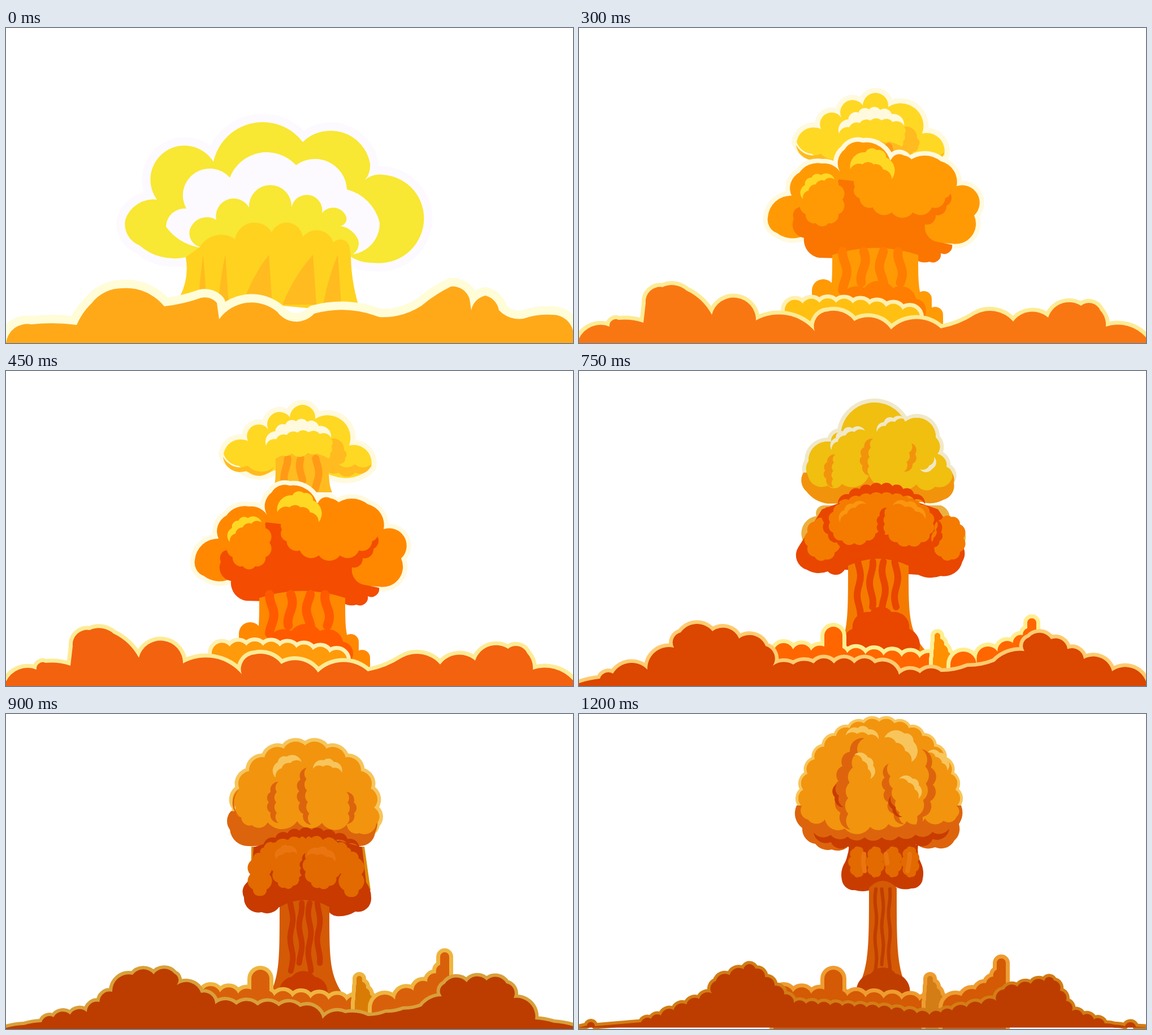
An HTML page that plays this animation: 1003x558 px, repeating every 1350 ms.

```html
<!DOCTYPE html>
<html lang="en">
<head>
<meta charset="utf-8">
<title>Explosion</title>
<style>
html, body { margin: 0; width: 100%; height: 100%; overflow: hidden; background: #fff; }
svg { display: block; width: 100vw; height: 100vh; }
path { paint-order: stroke; stroke-linejoin: round; stroke-linecap: round; }
.pose { visibility: hidden; animation: show 1350ms step-end infinite; }
@keyframes show {
  0% { visibility: visible; }
  11.1111%, 100% { visibility: hidden; }
}
</style>
</head>
<body>
<svg id="stage" viewBox="0 0 1003 558" preserveAspectRatio="none"></svg>
<script>
const range = (n, make) => Array.from({ length: n }, (_, i) => make(i));
const mix = (a, b, t) => a + (b - a) * t;
const path = (d, fill, rim = 'none', width = 0) =>
  `<path d="${d}" fill="${fill}" stroke="${rim}" stroke-width="${width}"/>`;

// Arcs from point to point; long sides are split into puffs of about the given size.
// The optional third value of a point is arc height / chord, negative for a dent.
function outline(points, size, closed = true) {
  let d = `M${points[0][0]} ${points[0][1]}`;
  for (let i = 0; i < points.length - (closed ? 0 : 1); i++) {
    const [x, y, bulge = .25] = points[i];
    const [nx, ny] = points[(i + 1) % points.length];
    const length = Math.hypot(nx - x, ny - y);
    const steps = size ? Math.max(1, Math.round(length / size)) : 1;
    const k = Math.abs(bulge);
    const r = k ? length / steps * (4 * k * k + 1) / (8 * k) : 0;
    for (let s = 1; s <= steps; s++)
      d += `A${r} ${r} 0 ${+(k > .5)} ${+(bulge > 0)} ${mix(x, nx, s / steps)} ${mix(y, ny, s / steps)}`;
  }
  return d;
}

const puffs = (fill, points, size, rim, width) => path(outline(points, size) + 'Z', fill, rim, width);

function ground(fill, points, size, rim, width, floor = 558) {
  const top = outline(points, size, false);
  return path(top, 'none', rim, width) + path(`${top}V${floor}H0Z`, fill);
}

const ring = (cx, cy, rx, ry, n, from = 0, sweep = 2 * Math.PI) => range(n, i => {
  const a = from + sweep * i / (sweep > 6 ? n : n - 1);
  return [cx + rx * Math.cos(a), cy + ry * Math.sin(a)];
});
const dome = (cx, cy, rx, ry, n) => ring(cx, cy, rx, ry, n, Math.PI, Math.PI);
const oval = (fill, cx, cy, rx, ry, n) => puffs(fill, ring(cx, cy, rx, ry, n));

// Scalloped crescent on the left-hand side of the way from one end to the other.
function strip(fill, x1, y1, x2, y2, width, n, bend = 0) {
  const length = Math.hypot(x2 - x1, y2 - y1);
  const at = (t, w, bulge) => {
    const off = (bend * 4 * t * (1 - t) + w * Math.sqrt(Math.sin(Math.PI * t))) / length;
    return [mix(x1, x2, t) + (y2 - y1) * off, mix(y1, y2, t) - (x2 - x1) * off, bulge];
  };
  const outer = range(n, i => at(i / n, width, .25));
  const inner = range(n, i => at(1 - i / n, 0, -.2));
  return puffs(fill, [...outer, ...inner]);
}

const stem = (fill, left, right, top, footLeft, footRight, bottom) => {
  const low = mix(top, bottom, .75), high = mix(top, bottom, .6);
  return path(`M${left} ${top}C${left} ${high} ${left} ${low} ${footLeft} ${bottom}H${footRight}` +
    `C${right} ${low} ${right} ${high} ${right} ${top}Q${(left + right) / 2} ${top - 25} ${left} ${top}Z`, fill);
};

const streaks = (color, x1, x2, top, bottom, n, width) => range(n, i => {
  const x = mix(x1, x2, i / (n - 1)), end = bottom - 14 * (i % 2);
  const points = range(13, j => {
    const y = mix(top, end, j / 12);
    return `${x + width / 4 * Math.sin(y / 11 + i * 2)} ${y}`;
  });
  return path('M' + points.join('L'), 'none', color, width);
}).join('');

const spikes = (fill, tip, foot, list) => list.map(([x, lean]) =>
  path(`M${x} ${tip}L${x + 6} ${foot}H${x - lean}Q${x - lean * .6} ${mix(tip, foot, .4)} ${x} ${tip}`, fill)).join('');

// Round-topped columns merged into one silhouette.
function skyline(fill, rim, columns) {
  const shapes = columns.map(([x, y, r]) => `M${x - r} 570V${y}A${r} ${r} 0 0 1 ${x + r} ${y}V570Z`);
  const d = shapes.join('');
  return path(d, rim, rim, 14) + path(d, fill);
}

function mounds(poleX, tipX, tipY, footX, main, rim, accent) {
  const row = range(9, i => [362 + 32 * i, 500 + 2.2 * i, 18]);
  const pole = range(4, i => [poleX + 3 * i, 469 + 14 * i, 5 + 4 * i]);
  const heap = range(6, i => [mix(tipX, footX, (i / 5) ** 2), mix(tipY, 520, (i / 5) ** .8), 8 + 3 * i]);
  return skyline(main, rim, [...row, [450, 469, 16]]) + skyline(accent, rim, pole) + skyline(main, rim, heap);
}

const move = (markup, transform) => `<g transform="${transform}">${markup}</g>`;
const recolor = (markup, colors) => markup.replace(/#\w{6}/g, c => colors[c] || c);

function flash() {
  return [
    puffs('#f8e733', [[318, 406, .12], [236, 385, .18], [211, 340, .18], [267, 304, .52], [367, 237, .32], [525, 202, .3],
      [644, 240, .1], [635, 269, .1], [668, 260, .21], [739, 345, .21], [650, 416, .08], [608, 404, 0]], 0, '#fdfaff', 30),
    puffs('#fdfaff', [[343, 389, .1], [283, 352, .22], [319, 320, .45], [396, 265, .28], [513, 243, .3], [603, 286, .14],
      [661, 345, .2], [610, 401, 0]]),
    puffs('#f8e733', [[343, 388, .2], [325, 358], [372, 340, .43], [430, 318, .53], [505, 318, .5], [559, 328, .3],
      [602, 335, .3], [584, 350, .15], [623, 375, .2], [609, 403, 0]]),
    puffs('#ffd21f', [[318, 406, 0], [343, 388, .22], [405, 374, .35], [470, 362, .38], [525, 370, .3], [579, 380, .35],
      [608, 392, 0], [610, 404, -.04], [628, 505, 0], [308, 475, -.08]]),
    spikes('#ffbb1f', 402, 490, [[349, 9], [388, 13], [465, 47], [543, 54], [587, 26]]),
    ground('#ffa919', [[0, 558, .22], [45, 525, .03], [125, 526, .05], [152, 487, .12], [208, 461, .12], [280, 493, -.03],
      [345, 478, .14], [373, 487, 0], [377, 516, .22], [480, 503, -.24], [545, 506, .08], [660, 512, -.08], [735, 492, .03],
      [787, 458, .18], [820, 480, 0], [823, 500, .15], [848, 474, .15], [872, 500, -.12], [915, 515, .05], [965, 508, .25],
      [1003, 553]], 0, '#fffcd8', 30)
  ].join('');
}

function fireball() {
  const cloud = [[395, 343, .05], [350, 347, .25], [344, 292, .22], [367, 234, .1], [355, 198, .1], [372, 165, .18], [408, 146, .22],
    [449, 174, .47], [539, 151, .12], [583, 133, .24], [639, 185, .1], [631, 215, .12], [660, 209, .24], [709, 255, .16],
    [682, 292, .2], [645, 346, 0]];
  return [
    puffs('#f8e733', cloud, 0, '#fdfaff', 24),
    puffs('#ffa305', [[345, 347, 0], [672, 336], [722, 380], [640, 432, .05], [410, 422, .06], [365, 429], [319, 385]]),
    puffs('#f8e733', cloud),
    strip('#ffc71c', 408, 332, 403, 219, 22, 5, 20),
    strip('#ffc71c', 633, 267, 604, 341, 18, 4, 6),
    strip('#fdfaff', 410, 243, 620, 252, 24, 6, 62),
    strip('#fdfaff', 430, 295, 476, 265, 18, 4, 20),
    strip('#fdfaff', 512, 237, 590, 290, 20, 4, 14),
    puffs('#ffa305', [[385, 355], [438, 323], [606, 323], [635, 352], [606, 395], [395, 395]], 40),
    strip('#ffdd00', 460, 380, 385, 350, 24, 5, 28),
    strip('#ffdd00', 637, 352, 577, 404, 18, 4, 8),
    puffs('#ffb224', [[440, 330], [550, 322], [540, 340], [450, 343]], 35),
    puffs('#ffb224', [[552, 330], [575, 310], [603, 318], [600, 333, 0]], 25),
    stem('#ffc20a', 407, 612, 408, 388, 627, 490),
    spikes('#ffa305', 390, 478, [[432, 14], [500, 38], [556, 44], [592, 20]]),
    ground('#ffe61a', [[370, 505, .15], [440, 478, .15], [472, 465, .14], [497, 475, -.24], [533, 478, .14], [570, 457, .16],
      [600, 472, .03], [617, 500]], 0, '#fdfaff', 16),
    puffs('#ffe61a', [[617, 502, .18], [640, 486, .18], [673, 507, 0], [640, 530, 0]]),
    ground('#ff8c14', [[0, 545, .3], [27, 530, .05], [92, 523, .25], [151, 515], [160, 487, .15], [197, 501, .18], [275, 494, .6],
      [300, 499, .18], [382, 520, .18], [466, 541], [534, 529, .18], [638, 525, .08], [793, 499, .15], [815, 522, .2],
      [877, 512, .28], [918, 515, .12], [930, 536, .2], [1003, 550]], 0, '#fffcd8', 20)
  ].join('');
}

function crown() {
  return [
    puffs('#ffd824', [[474, 176, .18], [412, 168, .15], [385, 147], [428, 124, .5], [466, 107, .5], [502, 82, .52], [547, 85, .36],
      [607, 132, .28], [646, 170, .15], [580, 186, .08], [568, 180, 0]], 0, '#fff9de', 18),
    strip('#ffbb1f', 474, 170, 384, 152, 9, 2, 7),
    strip('#ffbb1f', 646, 165, 560, 165, 16, 3, 0),
    strip('#ffbb1f', 575, 120, 560, 168, 28, 4, 6),
    stem('#ffbb1f', 477, 571, 155, 471, 577, 215),
    streaks('#ff9a16', 495, 550, 155, 208, 3, 13),
    oval('#ffd824', 513, 132, 50, 14, 11),
    strip('#fff9de', 460, 132, 575, 118, 20, 6, 16)
  ].join('');
}

function belly() {
  return [
    puffs('#ff8800', [[398, 368, .14], [350, 363, .18], [334, 335, .2], [376, 297, .2], [390, 256, .15], [430, 240, .15],
      [463, 257, .2], [470, 215, .18], [502, 203, .2], [551, 238, .45], [582, 237, .18], [640, 236, .2], [668, 280, .4],
      [699, 332, .3], [660, 382, 0]], 0, '#fff9de', 16),
    puffs('#f44c00', [[380, 338], [391, 317, 0], [440, 300, 0], [460, 268, 0], [655, 290], [650, 315], [612, 348, -.18],
      [630, 378, 0], [660, 384, .3], [620, 414, .1], [596, 411, 0], [425, 407, .2], [398, 372]], 30),
    oval('#ff8800', 572, 281, 84, 47, 14),
    oval('#ff8800', 430, 304, 36, 44, 10),
    strip('#ffd824', 480, 250, 553, 268, 26, 4, 18),
    strip('#ffd824', 396, 303, 452, 268, 14, 4, 10),
    stem('#ff8800', 448, 600, 402, 407, 645, 520),
    skyline('#ff8800', 'none', [[432, 465, 20], [610, 480, 14], [630, 508, 14]]),
    puffs('#ff5a00', [...dome(530, 510, 82, 52, 6), [610, 540, 0], [450, 540, 0]]),
    streaks('#ff5a00', 470, 568, 396, 465, 4, 16)
  ].join('');
}

const bellyGround = () => skyline('#ff9a0a', '#fff0b0', range(8, i => [382 + 29 * i, 497 + .6 * (i - 2) ** 2, 18])) +
  ground('#f3620f', [[0, 550, .2], [54, 529, .3], [70, 517, .05], [114, 522, 0], [118, 487, .25], [148, 459, .15], [190, 465, .08],
    [235, 508, .45], [313, 518, .18], [417, 537, .25], [440, 502, .15], [487, 519, .2], [552, 534, .2], [640, 532, -.05],
    [700, 508, .18], [768, 520, .22], [830, 513, .25], [888, 492, .25], [922, 500, .1], [932, 529, .15], [1003, 548]], 0, '#fdeb95', 14);

function goldCap() {
  const cloud = [[405, 185, .15], [406, 160], [447, 126, .3], [463, 110, .38], [577, 90, .32], [631, 118, .2], [634, 147, .2],
    [650, 170, .2], [660, 190, .2], [630, 205], [597, 201], [513, 185], [465, 200], [440, 203]];
  return [
    puffs('#f0bf10', cloud, 0, '#f0e8c8', 14),
    puffs('#f2930c', [[397, 180, 0], [655, 175, .15], [663, 198, .2], [645, 228, .1], [605, 232, 0], [440, 235, .1], [402, 213, .18]]),
    puffs('#f0bf10', cloud, 60),
    strip('#f2930c', 450, 206, 453, 148, 14, 4, 2),
    strip('#f2930c', 514, 185, 520, 120, 14, 4, 3),
    strip('#f2930c', 588, 128, 575, 178, 12, 3),
    strip('#f0e8c8', 447, 140, 506, 106, 9, 4, 10),
    strip('#f0e8c8', 527, 108, 577, 86, 8, 3, 4),
    strip('#f0e8c8', 628, 152, 603, 174, 8, 2, 6)
  ].join('');
}

function goldBase() {
  return [
    puffs('#ecb040', [[396, 300], [420, 257], [432, 238, 0], [640, 238, .2], [655, 266], [683, 302, 0]]),
    puffs('#e94600', [[388, 312, 0], [430, 245, 0], [530, 208, 0], [635, 245, 0], [680, 312, .12], [678, 338, .2], [640, 363, .1],
      [600, 361, 0], [470, 352], [440, 355, .12], [403, 352]]),
    oval('#f47b00', 530, 250, 75, 34, 16),
    oval('#f47b00', 431, 298, 28, 36, 9),
    oval('#f47b00', 654, 296, 26, 38, 9),
    strip('#e94600', 485, 310, 440, 240, 16, 4, 10),
    oval('#f47b00', 487, 268, 43, 37, 12),
    strip('#e94600', 545, 300, 545, 242, 12, 4, 4),
    oval('#f47b00', 584, 270, 42, 38, 12),
    strip('#e94600', 630, 262, 600, 315, 12, 4, 14),
    strip('#e94600', 458, 236, 612, 236, 16, 8, 18),
    strip('#fb9510', 462, 268, 508, 236, 9, 3, 6),
    strip('#fb9510', 555, 238, 612, 262, 10, 3, 6),
    stem('#f47b00', 476, 583, 345, 454, 622, 505),
    puffs('#e94600', dome(534, 505, 62, 82, 6)),
    streaks('#e94600', 495, 561, 338, 432, 4, 12)
  ].join('');
}

const goldGround = () => ground('#db4600', [[0, 553, .03], [37, 545], [60, 536], [121, 529], [168, 490], [180, 463], [236, 461],
  [330, 487], [343, 522, .15], [415, 518], [523, 518], [566, 538, .2], [640, 533, -.05], [735, 515, .12], [788, 496],
  [796, 472], [835, 475], [893, 510], [943, 532], [1003, 550]], 42, '#ffcb70', 13);

function amberCap() {
  const cloud = [...dome(529, 166, 122, 110, 11), [655, 195], [625, 211], [603, 196], [515, 190], [463, 192], [435, 197], [416, 183]];
  return [
    puffs('#f2940e', cloud, 40, '#f6c55c', 13),
    puffs('#dc640c', [[398, 172, 0], [655, 180, .1], [653, 210, .2], [625, 234, .1], [585, 222, -.05], [470, 228, .05],
      [430, 234, .2], [396, 205, .18]]),
    puffs('#f2940e', cloud, 40),
    strip('#dc640c', 414, 183, 412, 134, 9, 1),
    strip('#dc640c', 482, 193, 482, 120, 13, 4, 4),
    strip('#dc640c', 540, 196, 532, 95, 14, 5, 3),
    strip('#dc640c', 602, 138, 603, 195, 12, 3, 2),
    strip('#f8c55c', 477, 113, 523, 85, 14, 3, 10),
    strip('#f8c55c', 543, 97, 594, 104, 12, 3, 7)
  ].join('');
}

function amberBase() {
  return [
    puffs('#dd8a00', [[433, 300, 0], [434, 235, 0], [634, 235, 0], [645, 312, 0]]),
    puffs('#c83a00', [[438, 236, 0], [530, 208, 0], [630, 236, 0], [637, 298, .08], [646, 325], [618, 350, .08], [585, 358, .15],
      [568, 345, 0], [483, 342, .18], [452, 351], [421, 325, .15], [423, 302, -.1], [435, 275, 0]]),
    oval('#e26a00', 530, 246, 80, 25, 16),
    oval('#e26a00', 449, 284, 17, 38, 8),
    oval('#e26a00', 611, 284, 18, 40, 8),
    oval('#e26a00', 497, 268, 25, 40, 11),
    strip('#c83a00', 537, 300, 535, 245, 10, 4, 4),
    oval('#e26a00', 559, 268, 30, 40, 11),
    strip('#c83a00', 455, 235, 625, 238, 14, 8, 17),
    strip('#ea7510', 478, 258, 515, 248, 14, 3, 6),
    strip('#ea7510', 532, 252, 582, 262, 14, 3, 6),
    stem('#d45a05', 484, 572, 342, 463, 602, 505),
    puffs('#c83a00', dome(526, 505, 40, 46, 4)),
    streaks('#c83a00', 505, 553, 335, 455, 4, 10)
  ].join('');
}

const amberGround = () => ground('#bd3d00', [[0, 556, .03], [63, 546], [84, 537], [143, 528], [188, 492], [224, 462], [298, 460],
  [302, 480], [345, 494], [370, 514, .2], [520, 519], [560, 540, .18], [600, 530, .08], [640, 535, -.05], [735, 518, .12],
  [771, 500], [776, 478], [815, 475], [850, 472], [885, 477], [898, 503], [936, 541, .03], [1003, 553]], 36, '#d8a03a', 12);

function copperCap() {
  const cloud = [...dome(531, 163, 137, 149, 17), [668, 182], [645, 189], [612, 185], [515, 200], [470, 203], [435, 187], [405, 187]];
  return [
    puffs('#f2940e', cloud, 34, '#f8c55c', 10),
    puffs('#dd640c', [[385, 162, 0], [676, 162, .12], [672, 195, .15], [664, 224, .2], [630, 236, .12], [600, 233, 0], [477, 234, .15],
      [447, 240, .15], [418, 230, .2], [395, 202, .18]]),
    strip('#c83c00', 655, 203, 415, 210, 20, 8, 12),
    puffs('#f2940e', cloud, 34),
    strip('#dd640c', 480, 205, 505, 43, 20, 6, 14),
    strip('#dd640c', 575, 195, 548, 88, 14, 5, 4),
    strip('#dd640c', 606, 62, 582, 208, 13, 5, 18),
    strip('#c83c00', 468, 165, 456, 124, 8, 2, 2),
    strip('#c83c00', 572, 182, 552, 145, 7, 2, 2),
    strip('#f8c55c', 540, 42, 588, 85, 24, 3, 8),
    strip('#f8c55c', 472, 38, 530, 45, 11, 3, 6),
    strip('#f8c55c', 487, 72, 515, 115, 12, 3, 7),
    strip('#f8c55c', 566, 115, 600, 150, 11, 3, 8),
    strip('#f8c55c', 617, 68, 651, 100, 11, 3, 4)
  ].join('');
}

function copperBase() {
  return [
    puffs('#c83c00', [[478, 232, 0], [600, 232, -.08], [605, 264, .08], [608, 292, .2], [588, 309, .1], [560, 306, 0], [518, 311, .08],
      [488, 312, .2], [465, 294, .1], [471, 262, -.04]]),
    range(4, i => oval('#e26a00', 493 + 31 * i, 262, 13, 27, 9)).join(''),
    streaks('#ea7510', 505, 583, 248, 278, 3, 8),
    stem('#d45a05', 513, 562, 308, 482, 590, 505),
    puffs('#c03d00', dome(538, 505, 44, 52, 4)),
    streaks('#c03d00', 525, 549, 310, 458, 3, 6)
  ].join('');
}

const copperGround = () => ground('#bd3d00', [[0, 555, 0], [14, 552, .5], [28, 553, 0], [110, 546], [145, 534], [235, 495], [242, 473],
  [291, 452, .4], [312, 451], [380, 512], [530, 521], [620, 533], [660, 525], [738, 508], [752, 488], [823, 473, .4],
  [840, 472], [872, 526], [930, 548, .05], [966, 553, .4], [985, 554, 0], [1003, 555]], 23, '#d27d15', 11, 555.5);

const brighter = { '#ff8800': '#ff9a05', '#f44c00': '#fa7600', '#ff5a00': '#ff7d00', '#f3620f': '#f97712', '#ff9a0a': '#ffc012' };
const warmer = { '#f0bf10': '#f8cc1a', '#f2930c': '#f9a718', '#f47b00': '#fa8200', '#e94600': '#ee4900', '#db4600': '#e75508' };
const bright = ['#ff6600', '#ffee90', '#ff9000'];
const dusky = ['#d9600a', '#eeb540', '#d97c05'];
const dim = ['#d45a05', '#ee9c30', '#d27d15'];

const poses = [
  flash(),
  fireball(),
  move(crown(), 'translate(0 55)') + recolor(belly() + bellyGround(), brighter),
  crown() + belly() + bellyGround(),
  recolor(move(goldCap(), 'translate(0 -29.4) scale(1 1.125)') + goldBase(), warmer) +
    mounds(638, 810, 450, 675, ...bright) + recolor(goldGround(), warmer),
  goldCap() + goldBase() + mounds(634, 801, 446, 680, ...bright) + goldGround(),
  amberCap() + amberBase() + mounds(625, 776, 430, 670, ...dusky) + amberGround(),
  move(amberBase(), 'translate(96 0) scale(.82 1)') + move(copperCap(), 'translate(0 13) scale(1 .946)') +
    mounds(623, 760, 436, 668, ...dusky) + copperGround(),
  copperCap() + copperBase() + mounds(621, 747, 441, 666, ...dim) + copperGround()
];

document.getElementById('stage').innerHTML = poses.map((pose, i) =>
  `<g class="pose" style="animation-delay:${(i - poses.length) * 150}ms">${pose}</g>`).join('');
</script>
</body>
</html>
```
